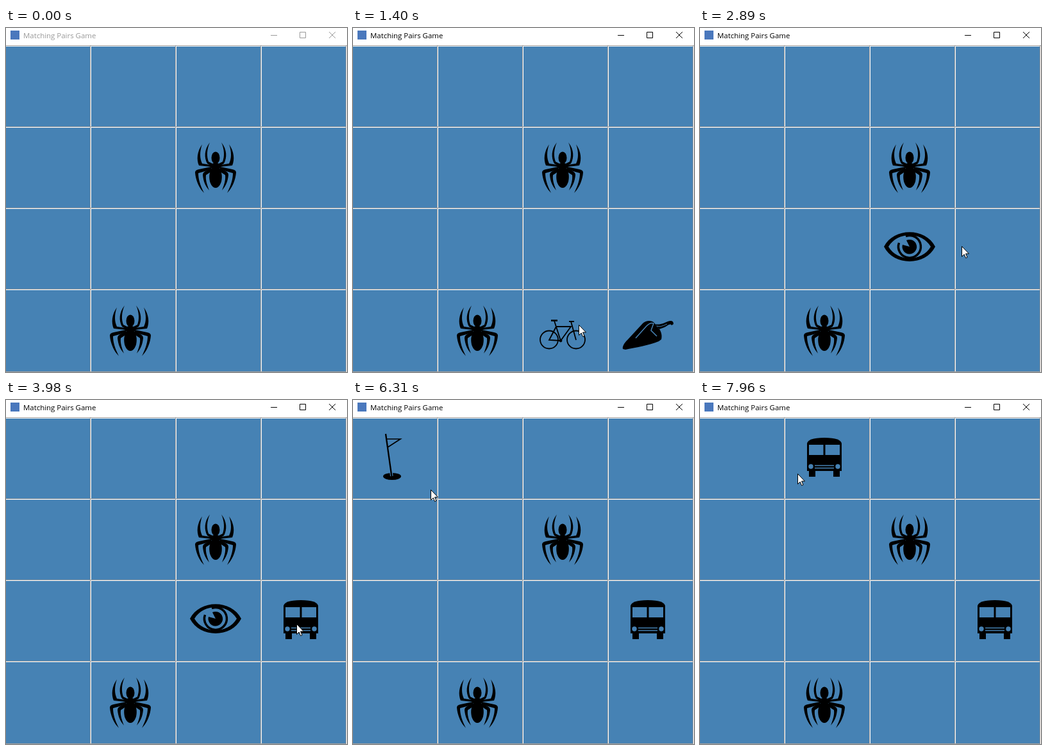
These frames come from a looping animation (532x538 px, 8000 ms). An HTML page:

```html
<!DOCTYPE html>
<html lang="en">
<head>
<meta charset="utf-8">
<title>Matching Pairs Game</title>
<style>
html, body { margin: 0; width: 100%; height: 100%; overflow: hidden; background: #fff; }
svg { display: block; }
text { font: 11.45px "Open Sans", "Noto Sans", sans-serif; }
.line { fill: none; stroke: #000; }
.hole { fill: #4682b4; }
.gap { fill: none; stroke: #4682b4; }
</style>
</head>
<body>
<svg width="532" height="538" viewBox="0 0 532 538">
  <defs>
    <g id="legs">
      <path d="M-21-36C-29-25-30-12-26-3L-8-1V-4L-21-6C-25-14-25-25-21-36Z"/>
      <path d="M-9-39C-18-28-18-15-13-6L-6-2L-5-6L-11-9C-14-17-14-28-9-39Z"/>
      <path d="M-7-1L-26 3Q-32 4-32 8C-31 20-26 32-18 40C-23 30-27 20-27 9L-6 3Z"/>
      <path d="M-7 2L-16 6Q-20 8-20 12C-19 22-16 29-10 36C-13 28-16 20-15 12L-6 6Z"/>
    </g>
    <g id="spider">
      <use href="#legs"/>
      <use href="#legs" transform="scale(-1 1)"/>
      <ellipse cy="-15" rx="6.500" ry="9.500"/>
      <ellipse cy="-2" rx="8.500" ry="5"/>
      <ellipse cy="15" rx="9.800" ry="17"/>
    </g>
    <g id="bus">
      <path d="M-27-19Q-27-29 0-29Q27-29 27-19V23H-27Z"/>
      <path d="M-24 22h10v10h-10ZM14 22h10v10h-10Z"/>
      <path class="hole" d="M-24-18h22.500v16h-22.500ZM1.500-18h22.500v16h-22.500Z"/>
      <circle class="hole" cx="-21" cy="16" r="3.700"/>
      <circle class="hole" cx="21" cy="16" r="3.700"/>
      <path class="gap" d="M-15 14.500H15M-15 18.500H15" stroke-width="1.300"/>
    </g>
  </defs>

  <rect width="532" height="538" fill="#fff"/>
  <rect x="7" y="4" width="14" height="14" fill="#4a78bd"/>
  <g id="bar">
    <text x="27" y="16" fill="currentColor">Matching Pairs Game</text>
    <path d="M413 11.500h10M458.500 6.500h9v9h-9ZM504 6l10 10M514 6l-10 10" fill="none" stroke="currentColor"/>
  </g>
  <rect y="27" width="532" height="1" fill="#a0a0a0"/>
  <g id="grid"></g>

  <use href="#spider" x="327" y="218"/>
  <use href="#spider" x="194" y="473"/>

  <g id="pepper">
    <path d="M421 502C420 498 423 493 428 488L452 462C457 457 466 457 470 461L474 467C480 471 483 480 481 487L477 490C462 496 440 500 425 503Z"/>
    <path d="M471 463C480 465 485 461 491 459Q500 456 500 463L497 465C495 461 490 466 486 468L478 471Z"/>
    <path class="gap" d="M441 485L458 466Q464 460 469 462L465 473L474 482" stroke-width="1.500"/>
    <path class="gap" d="M474 466C480 468 485 465 490 463" stroke-width="1"/>
  </g>

  <g id="bike" class="line" stroke-width="1.800">
    <circle cx="306" cy="487.500" r="14"/>
    <circle cx="348" cy="487.500" r="14"/>
    <path d="M314 458L324 489L340 467H317L306 488L324 489M337 459H345M340 459L348 488"/>
    <path d="M309 457.500H319" stroke-width="2.600"/>
    <circle cx="324" cy="489" r="1.500"/>
  </g>

  <g id="eye">
    <path fill-rule="evenodd" d="M287 342C302 311.500 352 311.500 367 342C352 372.500 302 372.500 287 342ZM294 342C308 318 346 318 360 342C346 366 308 366 294 342Z"/>
    <path class="line" stroke-width="3.500" d="M321 325.500A17.500 17.500 0 1 1 310.500 336"/>
    <path d="M327 342L322 332A11.300 11.300 0 1 1 316 339Z"/>
  </g>

  <use id="bus1" href="#bus" x="460" y="342"/>
  <use id="bus2" href="#bus" x="194" y="88"/>

  <g id="flag">
    <ellipse cx="61" cy="119.500" rx="14" ry="5.500"/>
    <path class="gap" d="M59.500 112L60.300 119" stroke-width="4.600"/>
    <path class="line" d="M51 53L60.300 119" stroke-width="2.300"/>
    <path class="line" d="M52 61H74L54 74" stroke-width="1.700"/>
  </g>

  <g id="mouse">
    <path d="M.5.500V16.500L4.200 13L6.600 18.700L9 17.600L6.500 12H11.500Z" fill="#fff" stroke="#000"/>
    <circle id="press" r="12" fill="#ff0" fill-opacity=".5"/>
  </g>
</svg>
<script>
const LOOP = 8000, STEP = 78, PRESS = 2, PEEK = 10;
const $ = id => document.getElementById(id);
const show = (id, on) => { $(id).style.display = on ? "" : "none"; };

// Where the mouse goes; a stop with a card is a click that lasts PRESS steps.
const stops = [
  { at: 4, x: 448, y: 515 },
  { at: 7, x: 440, y: 495, card: "pepper" },
  { at: 16, x: 352, y: 464, card: "bike", rest: 3 },
  { at: 32, x: 340, y: 328, card: "eye" },
  { at: 37, x: 408, y: 341 },
  { at: 40, x: 448, y: 400 },
  { at: 45, x: 442, y: 321, card: "bus1", rest: 2 },
  { at: 52, x: 458, y: 365, rest: 2 },
  { at: 60, x: 487, y: 353, card: "bus1" },
  { at: 64, x: 342, y: 226 },
  { at: 71, x: 87, y: 86, card: "flag", rest: 7 },
  { at: 81, x: 121, y: 140 },
  { at: 87, x: 519, y: 371 },
  { at: 90, x: 481, y: 356, card: "bus1" },
  { at: 97, x: 154, y: 95, card: "bus2", rest: 2 },
  { at: 102, x: 152, y: 115 }
];
const clicks = stops.filter(s => s.card);
const opens = c => c.at + PRESS;
const leaves = s => s.at + (s.card ? PRESS : 0) + (s.rest || 0);

// Every second click ends a turn; unlike cards turn back after PEEK steps.
function isOpen(id, k) {
  return clicks.some((c, i) => c.card === id && k >= opens(c) &&
    k < opens(clicks[i | 1]) + PEEK);
}

function mouseAt(k) {
  const i = stops.findIndex(s => s.at > k);
  const a = stops[i < 0 ? stops.length - 1 : Math.max(i - 1, 0)];
  const b = i < 0 ? a : stops[i];
  let u = Math.min(1, Math.max(0, (k - leaves(a)) / (b.at - leaves(a) || 1)));
  if (b.card) u = u * u * (3 - 2 * u);
  return [a.x + (b.x - a.x) * u, a.y + (b.y - a.y) * u].map(Math.round);
}

function drawGrid() {
  const rect = (x, y, w, h, c) => `<rect x="${x}" y="${y}" width="${w}" height="${h}" fill="${c}"/>`;
  let out = "";
  for (let row = 0; row < 4; row++) {
    for (let col = 0; col < 4; col++) {
      const x = col * 133 - 1, y = row * 127 + 28, h = row < 3 ? 127 : 129;
      out += rect(x, y, 133, h, "#a0a0a0") + rect(x, y, 132, h - 1, "#fff") +
        rect(x + 1, y + 1, 131, h - 2, "#4682b4");
    }
  }
  $("grid").innerHTML = out;
}

function draw(ms) {
  const k = Math.floor((ms % LOOP + 8) / STEP);
  for (const c of clicks) show(c.card, isOpen(c.card, k));
  show("press", clicks.some(c => k >= c.at && k < opens(c)));
  show("mouse", k >= stops[0].at);
  $("bar").style.color = k < clicks[0].at ? "#999" : "#000";
  $("mouse").setAttribute("transform", `translate(${mouseAt(k)})`);
}

drawGrid();
const start = performance.now();
function tick() {
  draw(performance.now() - start);
  requestAnimationFrame(tick);
}
tick();
</script>
</body>
</html>
```
